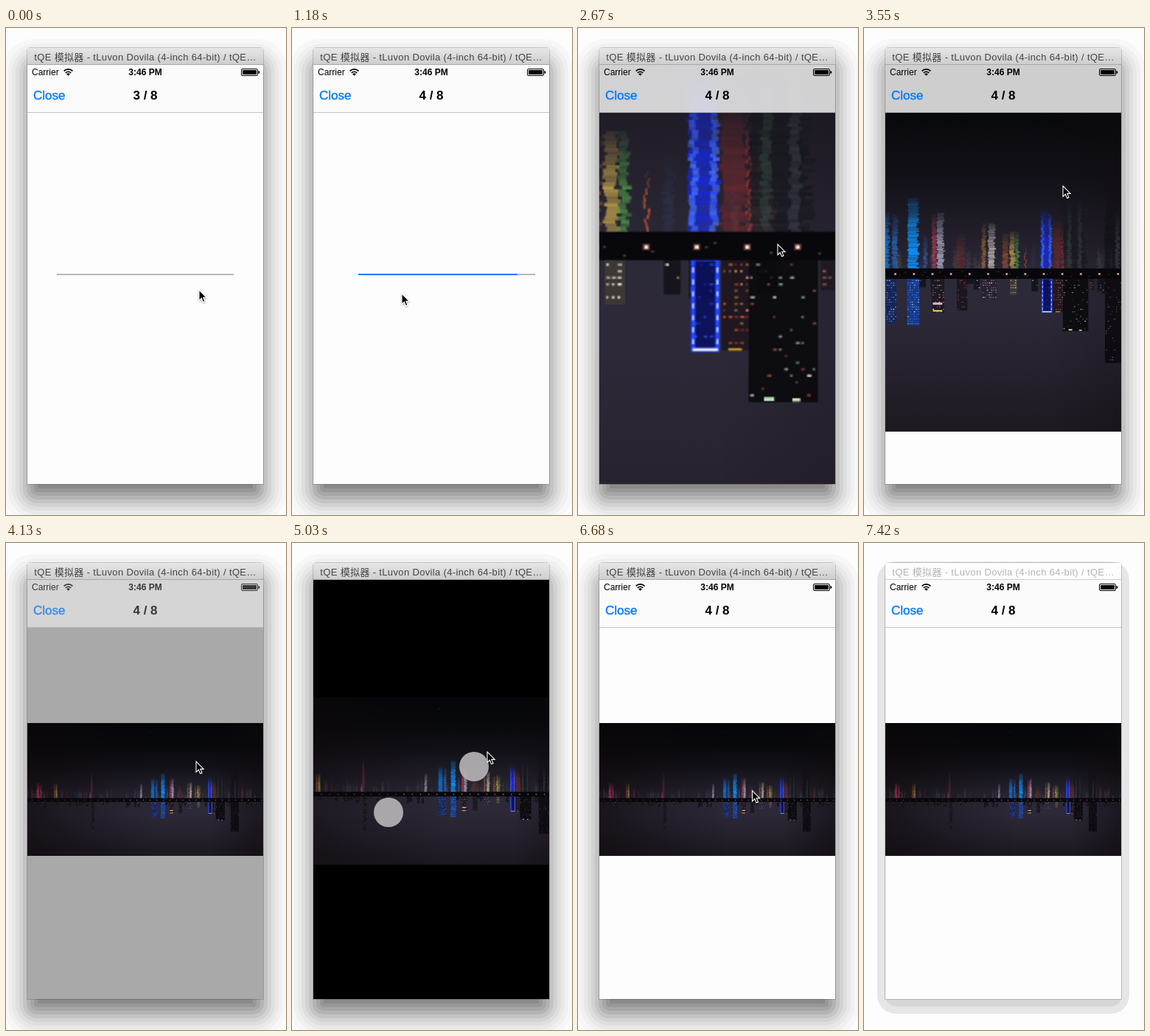
Recreate the animation shown at these times as an HTML page with a canvas. Size 380x660 px, loop 7.44 s.

```html
<!DOCTYPE html>
<html lang="zh">
<head>
<meta charset="utf-8">
<title>Photo browser</title>
<style>
  html, body { margin: 0; width: 100%; height: 100%; overflow: hidden; background: #fdfdfd; }
  body { position: relative; font-family: "Liberation Sans", Arial, "Noto Sans CJK SC", "Noto Sans CJK", sans-serif; color: #000; }
  body * { position: absolute; box-sizing: border-box; white-space: nowrap; }
  #shadow {
    left: 29px; top: 27px; width: 320px; height: 591px; border-radius: 14px;
    box-shadow: 0 20px 0 -14px #8a8a8a, 0 20px 0 -9px #989898, 0 20px 0 -4px #a6a6a6,
      0 20px 0 1px #b4b4b4, 0 20px 0 6px #c4c4c4, 0 20px 0 11px #d2d2d2,
      0 20px 0 16px #dedede, 0 20px 0 21px #e8e8e8, 0 20px 0 26px #f0f0f0, 0 20px 0 32px #f7f7f7;
  }
  .idle #shadow { box-shadow: 0 9px 0 1px #d6d6d6, 0 9px 0 11px #e6e6e6; }
  #win {
    left: 29px; top: 27px; width: 320px; height: 591px; overflow: hidden;
    border-radius: 4px 4px 0 0; background: #fdfdfd;
  }
  #edge { left: 29px; top: 27px; width: 320px; height: 591px; border-radius: 4px 4px 0 0; box-shadow: 0 0 0 1px rgba(0,0,0,.16); }
  #bar {
    left: 0; top: 0; width: 320px; height: 23px; line-height: 25px; text-align: center;
    font-size: 13px; letter-spacing: .35px; color: #444;
    background: linear-gradient(#e6e6e6, #cecece); border-bottom: 1px solid #a8a8a8;
  }
  .idle #bar { background: #fdfdfd; color: #b4b4b4; border-color: #ccc; }
  #view { left: 0; top: 23px; }
  #head {
    left: 0; top: 23px; width: 320px; height: 65px; background: rgba(250,250,250,.82);
    -webkit-backdrop-filter: blur(10px); backdrop-filter: blur(10px);
    border-bottom: 1px solid rgba(0,0,0,.22);
  }
  #carrier { left: 6px; top: 3px; font-size: 12px; line-height: 15px; }
  #clock { left: 0; width: 320px; top: 3px; text-align: center; font: bold 12px/15px "Liberation Sans", Arial, sans-serif; }
  #close { left: 8px; top: 32px; font-size: 17px; line-height: 20px; color: #007aff; -webkit-text-stroke: .4px #007aff; }
  #count { left: 0; width: 320px; top: 32px; text-align: center; font: bold 17px/20px "Liberation Sans", Arial, sans-serif; }
  #icons { left: 0; top: 0; }
  .touch { left: -20px; top: -20px; width: 40px; height: 40px; border-radius: 50%; background: rgba(184,182,184,.9); }
  #cursor { left: -2px; top: -2px; overflow: visible; }
</style>
</head>
<body>
<div id="shadow"></div>
<div id="edge"></div>
<div id="win">
  <div id="bar">tQE 模拟器 - tLuvon Dovila (4-inch 64-bit) / tQE…</div>
  <canvas id="view" width="320" height="568"></canvas>
  <div id="head">
    <svg id="icons" width="320" height="20">
      <g fill="none" stroke="#000" stroke-width="1.7">
        <path d="M49.6 8.4a8.2 8.2 0 0 1 11.8 0"/>
        <path d="M51.8 10.8a5.2 5.2 0 0 1 7.4 0"/>
      </g>
      <path d="M53.2 12.4a3.3 3.3 0 0 1 4.6 0L55.5 14.8z"/>
      <rect x="290.5" y="5.5" width="22" height="9" rx="1.5" fill="none" stroke="#000"/>
      <rect x="292" y="7" width="19" height="6"/>
      <path d="M313.5 8a2 2 0 0 1 0 4z"/>
    </svg>
    <span id="carrier">Carrier</span>
    <span id="clock">3:46 PM</span>
    <span id="close">Close</span>
    <span id="count">3 / 8</span>
  </div>
</div>
<div class="touch"></div>
<div class="touch"></div>
<svg id="cursor" width="20" height="24">
  <path d="M2 2V16.4L5.4 13.3L7.6 18.6L10 17.6L7.8 12.4H12.2Z" fill="#000" stroke="#fff" stroke-width="1.1"
    style="filter:drop-shadow(0 1px 1px rgba(0,0,0,.35))"/>
</svg>
<script>
const LOOP = 7440, PITCH = 340;
const $ = id => document.getElementById(id);
const view = $('view').getContext('2d');
const touches = document.querySelectorAll('.touch');

// Keys are [position, ...values]; values run straight between keys.
function at(keys, p) {
  let i = 0;
  while (i < keys.length - 2 && p >= keys[i + 1][0]) i++;
  const a = keys[i], b = keys[i + 1];
  const k = Math.max(0, Math.min(1, (p - a[0]) / (b[0] - a[0])));
  return a.slice(1).map((v, j) => v + (b[j + 1] - v) * k);
}

// The screen refreshes in steps: [ms, step]
const clock = [[0, 0], [150, 1], [1180, 8], [1330, 9], [2080, 14], [2370, 16], [3110, 21], [3400, 23],
  [3840, 26], [4130, 28], [5030, 34], [6080, 41], [6230, 42], [7270, 49], [7420, 50]];
const scroll = [[3, 0], [4, 18], [5, 70], [6, 175], [7, 270], [8, 319], [9, 336], [10, 340]];
const load = [[5, 0], [7, .6], [8, .9], [9, 1]];
const zoom = [[16, 1, 29, 244], [17, 5.5, -1158, -260], [18, 7.7, -1738, -507], [22, 7.7, -1738, -507],
  [23, 5.4, -1120, -248], [24, 2.83, -454, 38], [25, 1.3, -50, 207], [26, 1, 29, 244], [31, 1, 29, 244],
  [34, 1.26, -13, 209], [37, 2.417, -198, 112], [39, 1.4, -35, 208], [41, .99, 32, 246], [42, 1, 29, 244]];
const dark = [[27, 0], [30, 1], [42, 1], [45, 0]];
const pointer = [[0, 262, 355], [3, 270, 357], [5, 232, 358], [7, 160, 360], [8, 149, 360], [9, 152, 360],
  [14, 279, 345], [16, 279, 345], [18, 271, 293], [23, 270, 214], [24, 270, 214], [28, 258, 296],
  [31, 243, 303], [34, 265, 283], [37, 312, 252], [40, 238, 298], [41, 233, 296], [44, 233, 296],
  [46, 240, 375], [49, 258, 642]];
const finger = [[31, 44, -23], [34, 58, -31], [37, 106, -62], [40, 42, -27]];

let seed = 11;
function rnd() {
  seed = (seed * 16807) % 2147483647;
  return seed / 2147483647;
}

// Night skyline hanging below its shore, 320 x 180 units
function makePhoto() {
  const cv = document.createElement('canvas'), q = 4;
  cv.width = 320 * q;
  cv.height = 180 * q;
  const g = cv.getContext('2d');
  g.scale(q, q);
  const box = (x, y, w, h, color, alpha = 1) => {
    g.globalAlpha = alpha;
    g.fillStyle = color;
    g.fillRect(x, y, w, h);
  };
  const fade = (grad, stops) => {
    stops.forEach(([p, c]) => grad.addColorStop(p, c));
    return grad;
  };
  box(0, 0, 320, 180, fade(g.createLinearGradient(0, 0, 0, 180), [[0, '#05060a'], [.16, '#08090d'],
    [.32, '#121118'], [.47, '#211e29'], [.58, '#2c2938'], [.68, '#2d2938'], [.82, '#27222f'], [1, '#1c1920']]));
  box(0, 0, 320, 180, fade(g.createLinearGradient(0, 0, 320, 0), [[0, 'rgba(14,8,10,.6)'], [.3, 'rgba(14,8,10,.25)'],
    [.55, 'rgba(14,8,10,0)'], [.78, 'rgba(14,8,10,0)'], [1, 'rgba(14,10,12,.55)']]));

  // Rippled reflection of x0..x1, brightest at the shore
  const ripple = (x0, x1, top, color, alpha) => {
    for (let y = top; y < 102; y += .6) {
      const k = Math.min(1, (y - top) / (102 - top) * 1.6 + .15);
      const j = (rnd() - .5) * .9, trim = rnd() * (x1 - x0) * .25;
      box(x0 + j, y, x1 - x0 - trim, .65, color, alpha * k * (.55 + rnd() * .45));
    }
  };
  const tower = (x0, x1, end, body, colors, density) => {
    box(x0, 106, x1 - x0, end - 106, body, .9);
    for (let y = 107.3; y < end - .6; y += 1.15)
      for (let x = x0 + .3; x < x1 - .4; x += 1)
        if (rnd() < density)
          box(x, y, .35 + rnd() * .45, .4, colors[Math.floor(rnd() * colors.length)], .5 + rnd() * .5);
  };
  const warm = ['#ffd9a0', '#e8e4da', '#d98950'], cool = ['#4f8cff', '#2a5be0', '#bcd4ff'];

  // Faint distant lights
  for (let i = 0; i < 75; i++) {
    const x = rnd() * 318, w = .8 + rnd() * 2.2;
    ripple(x, x + w, 84 + rnd() * 14, ['#6b3a42', '#6a6272', '#7a6244', '#33456a'][i % 4], .3);
    if (i % 2) tower(x, x + w + 1, 108 + rnd() * 7, '#15121a', warm, .18);
  }

  ripple(13, 16.5, 81, '#c42e68', .8);
  ripple(17, 20, 83, '#8c3648', .7);
  ripple(36, 38, 82, '#a84a30', .7);
  ripple(38.5, 41, 82, '#b59a42', .65);
  ripple(86, 88.5, 66, '#7c3238', .55);
  ripple(84.5, 86, 92, '#c23a78', .7);
  tower(87, 91, 143, '#17131a', ['#8e8079', '#6c5f62'], .4);
  ripple(153, 156, 82, '#b9a7c8', .7);
  ripple(168, 173, 75, '#087ff0', .95);
  ripple(174, 177, 76, '#286ac4', .85);
  ripple(181.5, 187, 68, '#0b91ff', 1);
  ripple(189, 191, 86, '#3a6ac0', .6);
  ripple(193, 195.4, 76, '#bd405e', .75);
  ripple(195.5, 199, 75, '#c6c4de', .75);
  ripple(205, 209, 85, '#7c302c', .55);
  ripple(217, 219, 80, '#a87838', .7);
  ripple(220, 223.5, 80, '#dcd6cc', .8);
  ripple(227, 230, 85, '#a85632', .7);
  ripple(230.4, 233, 84, '#cfae4b', .85);
  ripple(233, 234.8, 84, '#4f9b45', .8);
  ripple(237.6, 238.1, 91, '#d05a30', .9);
  ripple(245.3, 250.8, 74, '#1528d8', .95);
  ripple(245.5, 246.8, 76, '#4c76ff', .8);
  ripple(249.2, 250.6, 76, '#4c76ff', .8);
  ripple(251, 255.8, 79, '#7c2a2c', .65);
  ripple(255.6, 256.1, 80, '#b03430', .8);
  ripple(256, 267.5, 66, '#15171c', .75);
  ripple(258, 260, 70, '#44604f', .35);
  ripple(263, 265, 70, '#4f5764', .4);
  ripple(276, 287, 60, '#100f15', .7);
  ripple(281, 283, 75, '#58626a', .4);
  ripple(291, 293, 85, '#70373a', .55);

  tower(168, 176, 128, '#14245c', cool, .55);
  tower(181, 187, 129, '#143a8c', ['#3f8fff', '#d2e4ff', '#2a6cf0'], .7);
  tower(193, 199, 123, '#1c1722', warm, .35);
  box(193.4, 118, 4.6, 1.1, '#e4a8c8');
  box(193.4, 121.6, 4.6, .8, '#e8c35c');
  tower(205, 210, 122, '#1a161f', ['#a8503c'], .25);
  tower(217, 224, 116, '#292030', ['#e7b8e6', '#f0e2d2', '#b877d8'], .65);
  tower(230.4, 234, 114.5, '#403a38', ['#fff0d0', '#e0dccf'], .85);
  tower(245.6, 250.6, 122.7, '#0a115e', ['#3c5cff', '#1e2ec0'], .3);
  g.globalAlpha = 1;
  g.strokeStyle = '#2447ff';
  g.lineWidth = .75;
  g.strokeRect(246, 106.5, 4.3, 16);
  for (let y = 108; y < 122; y += 2.1) {
    box(245.8, y, .4, .9, '#a9c0ff');
    box(250.1, y, .4, .9, '#a9c0ff');
  }
  box(245.9, 122.2, 4.5, .5, '#e6ecff');
  tower(251, 255.8, 122.6, '#1e171f', ['#c84a30', '#8e3a30', '#d08a50'], .5);
  box(252.2, 122.2, 2.4, .4, '#d6a02c');
  tower(255.8, 268, 131.7, '#0a090d', ['#d9dee0', '#8a4a34', '#7f9c98'], .13);
  box(258.5, 130.8, 1.8, .7, '#b8dfaa');
  box(263.5, 131, 1.4, .6, '#c9d9b4');
  tower(268.5, 271, 112, '#1f1921', ['#a35a48'], .4);
  tower(276, 287, 147, '#0d0b10', ['#76706f', '#525a62'], .13);

  // Shore with its lamps
  box(0, 101.7, 320, 5, '#08070b');
  for (let x = 6.3; x < 320; x += 8.9) {
    const a = x > 130 ? 1 : .45;
    box(x - .6, 103.8, 1.3, 1.2, '#b0624e', .45 * a);
    box(x - .3, 104.1, .7, .6, '#fff0e4', a);
  }
  for (let i = 0; i < 40; i++) box(rnd() * 320, 103 + rnd() * 3, .5, .35, '#7a6a70', .6);
  box(168.4, 12, .5, .8, '#4c4d55');
  return cv;
}
const photo = makePhoto();

function progress(x, part) {
  view.fillStyle = '#b7b7b7';
  view.fillRect(x, 283, 240, 2);
  view.fillStyle = '#007aff';
  view.fillRect(x, 283, 240 * part, 2);
}

const move = (el, x, y) => { el.style.transform = `translate(${x}px,${y}px)`; };

function draw(n) {
  const [d] = at(dark, n), tone = Math.round(253 * (1 - d));
  view.fillStyle = `rgb(${tone},${tone},${tone})`;
  view.fillRect(0, 0, 320, 568);
  if (n < 10) {
    const [s] = at(scroll, n);
    progress(40 - s, 0);
    progress(40 + PITCH - s, at(load, n)[0]);
  } else {
    const [s, x, y] = at(zoom, n);
    view.imageSmoothingQuality = 'high';
    view.drawImage(photo, x - 29, y - 50, 320 * s, 180 * s);
  }
  $('head').style.opacity = 1 - d;
  $('head').style.visibility = d < 1 ? 'visible' : 'hidden';
  $('count').textContent = (n < 6 ? 3 : 4) + ' / 8';

  const [fx, fy] = at(finger, n), down = n >= 31 && n < 41;
  touches.forEach((el, i) => {
    const side = i ? 1 : -1;
    el.style.display = down ? 'block' : 'none';
    move(el, 189 + side * fx, 334 + side * fy);
  });
  const [cx, cy] = at(pointer, n);
  move($('cursor'), cx, cy);
  $('cursor').style.display = n < 50 ? 'block' : 'none';
  document.body.className = n >= 50 ? 'idle' : '';
}

let shown = -1;
function tick() {
  const n = Math.floor(at(clock, performance.now() % LOOP)[0] + .001);
  if (n !== shown) draw(shown = n);
  requestAnimationFrame(tick);
}
tick();
</script>
</body>
</html>
```
